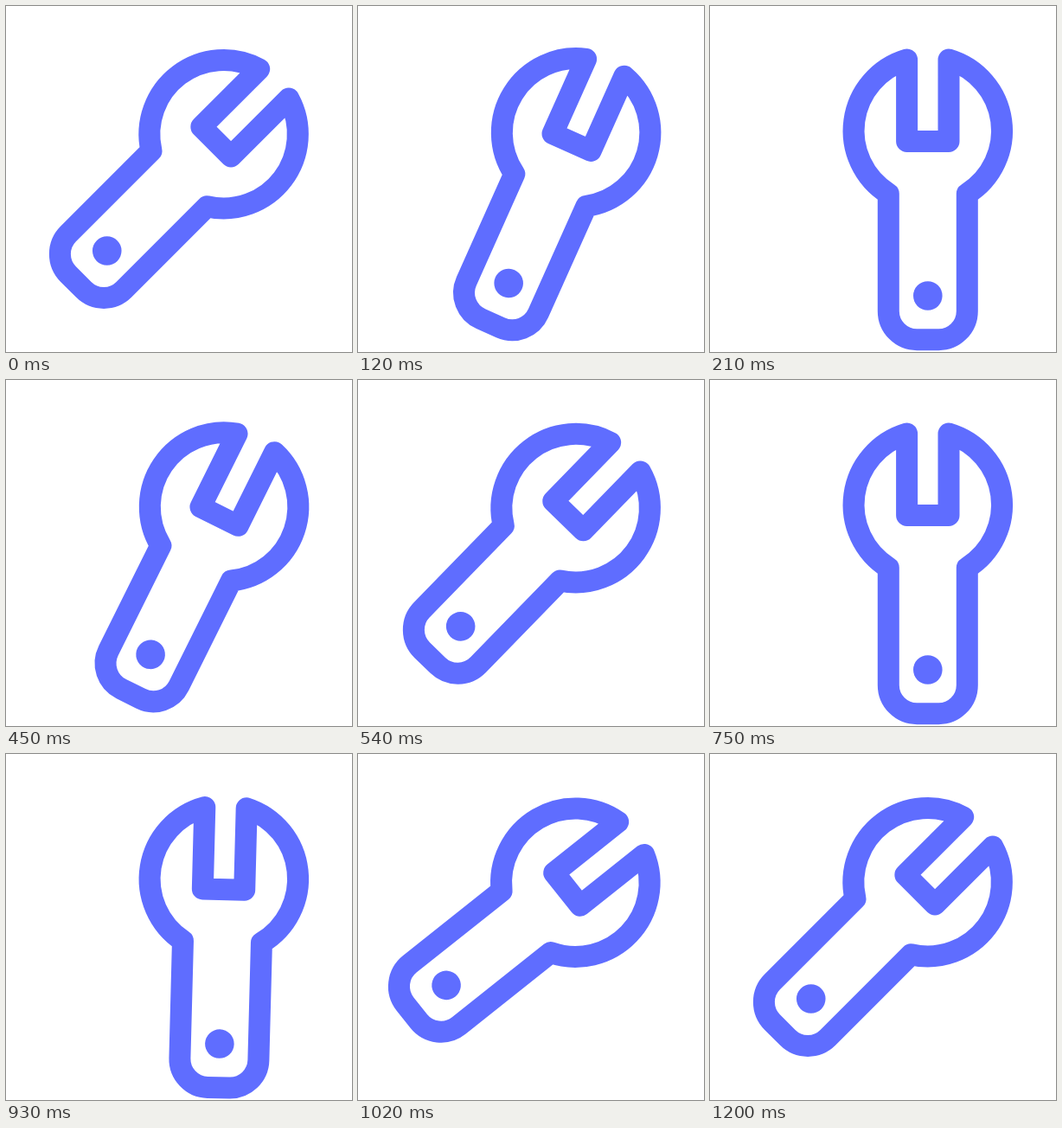
Write an HTML page that moves like this. It is 400x400 px and loops after 1230 ms.

```html
<!DOCTYPE html>
<html lang="en">
<head>
<meta charset="utf-8">
<title>Wrench</title>
<style>
  html, body { margin: 0; height: 100%; overflow: hidden; background: #fff; }
  svg { display: block; width: 100%; height: 100%; }
</style>
</head>
<body>
<svg viewBox="0 0 400 400">
  <g id="wrench">
    <path fill="none" stroke="#5f6dff" stroke-width="25" stroke-linejoin="round"
      d="M227.6 62V156.5H276V62A85.8 85.8 0 0 1 297.3 217V352.7a33 33 0 0 1-33 33h-25a33 33 0 0 1-33-33V217A85.8 85.8 0 0 1 227.6 62Z"/>
    <circle cx="251.8" cy="335" r="16.8" fill="#5f6dff"/>
  </g>
</svg>
<script>
const LOOP = 1230, STEP = 30, REST = 45, PEAK = 51.5;
const wrench = document.getElementById('wrench');
const start = performance.now();

const part = (t, from, to) => Math.min(1, Math.max(0, (t - from) / (to - from)));
const ease = x => (1 - Math.cos(Math.PI * x)) / 2;

// Turn down, swing up and back, then swing past the rest angle and settle.
function angle(t) {
  if (t < 300) return REST * Math.cos(Math.PI / 2 * part(t, 0, 187.5));
  if (t < 900) return REST * Math.sin(Math.PI * part(t, 375, 750));
  if (t < 1020) return PEAK * ease(part(t, 919, 1020));
  return PEAK + (REST - PEAK) * ease(part(t, 1020, 1200));
}

function draw(now) {
  const t = Math.max(0, now - start) % LOOP;
  const a = angle(Math.floor(t / STEP) * STEP);
  wrench.setAttribute('transform', `rotate(${a} 247 146)`);
  requestAnimationFrame(draw);
}
draw(start);
</script>
</body>
</html>
```
